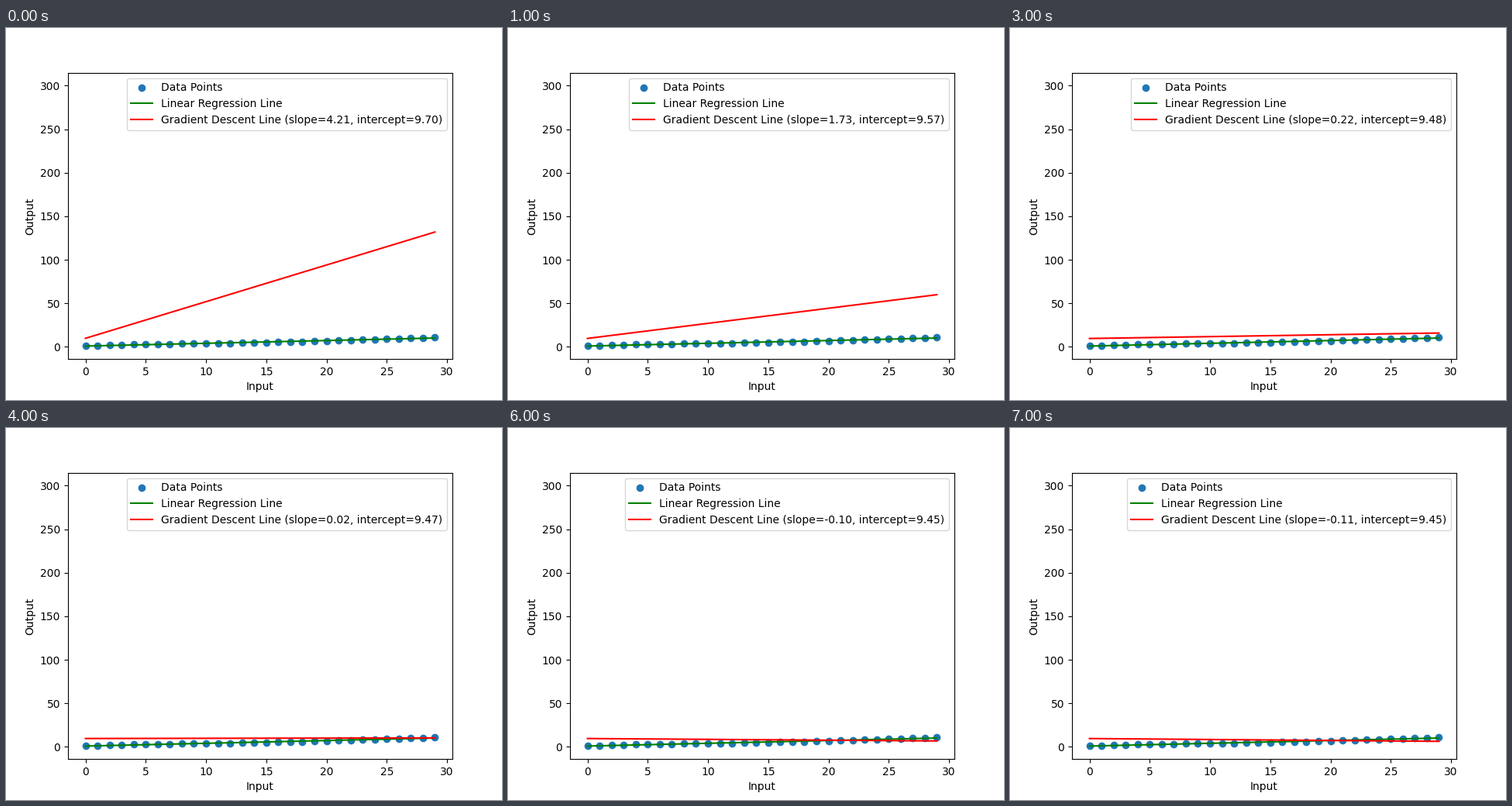
A matplotlib script that plays this animation: 640x480 px, repeating every 8000 ms.

```python
import numpy as np
import matplotlib.pyplot as plt
from matplotlib.animation import FuncAnimation

FRAMES = 8
RATE = 0.001


def fit(values):
    """Return the least-squares line through values."""
    return np.polyval(np.polyfit(x, values, 1), x)


def descend(slope, intercept, steps):
    """Return the (slope, intercept) pair after each descent step."""
    path = []
    for _ in range(steps):
        error = slope * x + intercept - y
        slope -= RATE * 2 * np.mean(error * x)
        intercept -= RATE * 2 * np.mean(error)
        path.append((slope, intercept))
    return path


def label(slope, intercept):
    return f"Gradient Descent Line (slope={slope:.2f}, intercept={intercept:.2f})"


# A straight trend with a gentle wave that leaves the trend unchanged
x = np.arange(30)
wave = 0.6 * np.cos(2 * np.pi * (x - 3) / 25)
y = 0.318 * x + 0.802 + wave - fit(wave)

start = (10.0, 10.0)
path = descend(*start, FRAMES)

fig, ax = plt.subplots(figsize=(6.4, 4.8), dpi=100)
ax.scatter(x, y, label="Data Points")
ax.plot(x, fit(y), color="green", label="Linear Regression Line")
# The starting guess sets the axis limits
line, = ax.plot(x, np.polyval(start, x), color="red", label=label(*path[0]))
ax.set_xlabel("Input")
ax.set_ylabel("Output")
ax.set_xlim(ax.get_xlim())
ax.set_ylim(ax.get_ylim())
legend = ax.legend(loc="upper right")
caption = legend.get_texts()[2]


def update(i):
    line.set_ydata(np.polyval(path[i], x))
    caption.set_text(label(*path[i]))
    return line, legend


anim = FuncAnimation(fig, update, frames=FRAMES, interval=1000,
                     repeat=True, repeat_delay=0, blit=False)
plt.show()
```
